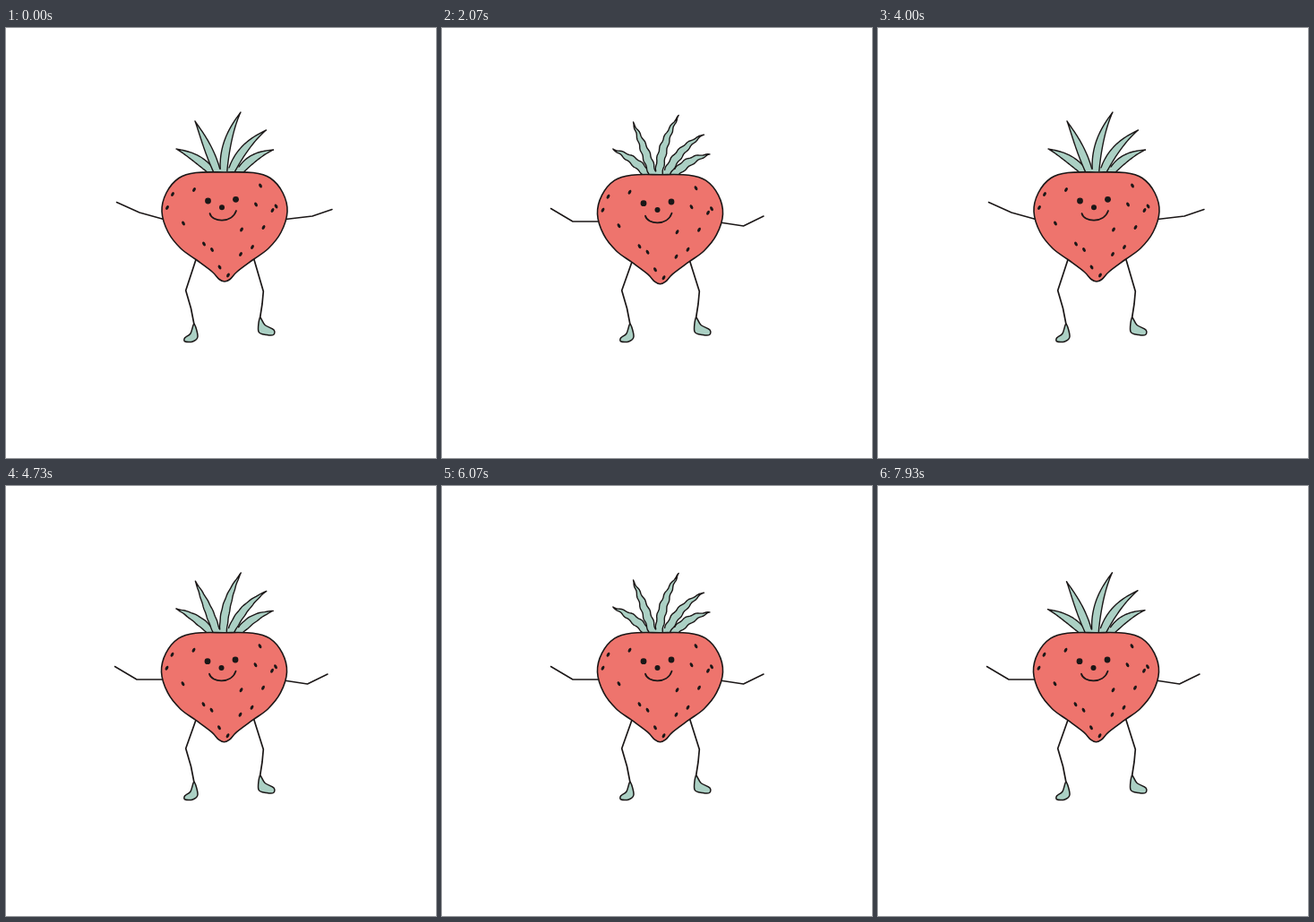
Write an HTML page with a canvas that moves like this. It is 480 by 480 pixels and loops after 7990 ms.

```html
<!DOCTYPE html>
<html lang="en">
<head>
<meta charset="utf-8">
<title>Dancing strawberry</title>
<style>
  html, body { margin: 0; width: 100%; height: 100%; overflow: hidden; background: #fff; }
  canvas { display: block; }
</style>
</head>
<body>
<canvas id="stage" width="480" height="480"></canvas>
<script>
const LOOP = 7990, STEP = 200 / 3, SWAY_STEPS = 60, MIDDLE = 244;
const INK = '#1b1717', RED = '#ee746d', GREEN = '#abd0c4';
const c = document.getElementById('stage').getContext('2d');
c.lineCap = c.lineJoin = 'round';

// Smooth closed curve through key points
function blob(points) {
  const path = new Path2D(), n = points.length;
  const at = i => points[(i + n) % n];
  path.moveTo(...at(0));
  for (let i = 0; i < n; i++) {
    const [a, p, q, b] = [at(i - 1), at(i), at(i + 1), at(i + 2)];
    path.bezierCurveTo(p[0] + (q[0] - a[0]) / 6, p[1] + (q[1] - a[1]) / 6,
      q[0] - (b[0] - p[0]) / 6, q[1] - (b[1] - p[1]) / 6, ...q);
  }
  path.closePath();
  return path;
}

const side = [[212, 161.5], [193, 167.5], [179, 184], [174, 205], [181, 228],
  [195, 246], [212, 258.5], [230, 272], [238, 280.5]];
const mirrored = side.map(([x, y]) => [2 * MIDDLE - x, y]).reverse();
const body = blob([[MIDDLE, 161], ...side, [MIDDLE, 283], ...mirrored]);
const mouth = new Path2D('M227.5 207C230 217 252 218.5 257 204');
const feet = [
  blob([[210, 330.5], [214, 344.5], [208.5, 350], [200, 350], [199.5, 346], [206, 341]]),
  blob([[283.5, 323.5], [289, 331.5], [299, 337], [298.5, 342.5], [291, 342.5], [282, 339]])
];
const seeds = [[186, 185.5], [180, 200.5], [210, 180.5], [198, 218], [221, 241], [230, 247.5],
  [238.5, 267], [248, 276], [284, 176], [279, 197], [297.5, 203.5], [301.5, 199],
  [263, 225], [287.5, 222.5], [275, 244.5], [262, 252.5]];

// Each leaf: base x, tip x, tip y, bow
const leaves = [[228, 190, 135, -5], [235, 211, 104, -2], [243, 262, 94, 9],
  [252, 290.5, 114, 9], [262, 298.5, 136, 7]];

const poses = [
  { arms: [[[123.5, 194.5], [149, 206], [176, 213.5]], [[312, 213.5], [342, 210], [364, 202.5]]],
    x: 0, y: 0 },
  { arms: [[[121.5, 201.5], [146, 216], [175, 216]], [[310, 217], [336.5, 221], [359, 210]]],
    x: -.5, y: 2.7 }
];

function line(points, width) {
  c.lineWidth = width;
  c.beginPath();
  points.forEach(p => c.lineTo(...p));
  c.stroke();
}

function shape(path, color, width) {
  c.fillStyle = color;
  c.lineWidth = width;
  c.fill(path);
  c.stroke(path);
}

function dot(x, y, rx, ry = rx, tilt = 0) {
  c.beginPath();
  c.ellipse(x, y, rx, ry, tilt, 0, 7);
  c.fill();
}

// Tapered leaf on a bowed spine; its edges ripple as it sways
function leaf(baseX, tipX, tipY, bow, sway) {
  const baseY = 158.5, dx = tipX - baseX, dy = tipY - baseY, len = Math.hypot(dx, dy);
  const path = new Path2D();
  for (let s = -1; s <= 1; s += 1 / 24) {
    const t = 1 - Math.abs(s);
    const width = 4 * (1 - t) ** 1.2 * (1 + 2.4 * t);
    const ripple = .55 * sway * Math.sin(len * t * .5);
    const off = 2 * t * (1 - t) * bow + ripple - Math.sign(s) * width;
    path.lineTo(baseX + dx * t + dy / len * off, baseY + dy * t - dx / len * off);
  }
  shape(path, GREEN, 1.4);
}

function crown(sway) {
  c.fillStyle = GREEN;
  c.fill(new Path2D('M224 162L230 156H260L269 162Z'));
  const turn = .045 * sway;
  for (const [baseX, tipX, tipY, bow] of leaves)
    leaf(baseX, tipX - (tipY - 161) * turn, tipY + (tipX - MIDDLE) * turn, bow, sway);
}

function draw(n) {
  const pose = poses[n % 2];
  const sway = (1 - Math.cos(n / SWAY_STEPS * 2 * Math.PI)) / 2;
  c.fillStyle = '#fff';
  c.fillRect(0, 0, 480, 480);
  c.strokeStyle = INK;

  pose.arms.forEach(arm => line(arm, 1.5));
  const hipY = 257 + pose.y;
  line([[212.5, hipY], [200.7, 293], [206.5, 313], [210, 331]], 1.7);
  line([[276.5, hipY], [287.3, 294], [286, 308], [283.5, 324]], 1.7);
  feet.forEach(foot => shape(foot, GREEN, 1.5));

  c.save();
  c.translate(pose.x, pose.y);
  crown(sway);
  shape(body, RED, 1.6);
  c.fillStyle = INK;
  for (const [x, y] of seeds)
    dot(x, y, 1.6, 2.7, .5 * Math.sign((x - MIDDLE) * (y - 202)));
  dot(225.5, 193, 3.4);
  dot(256.5, 191.3, 3.4);
  dot(241, 200.3, 3);
  c.lineWidth = 1.8;
  c.stroke(mouth);
  c.restore();
}

const start = performance.now();
function tick() {
  const t = Math.floor((performance.now() - start) % LOOP / 10) * 10;
  draw(Math.floor((t + 4.9) / STEP));
  requestAnimationFrame(tick);
}
tick();
</script>
</body>
</html>
```
